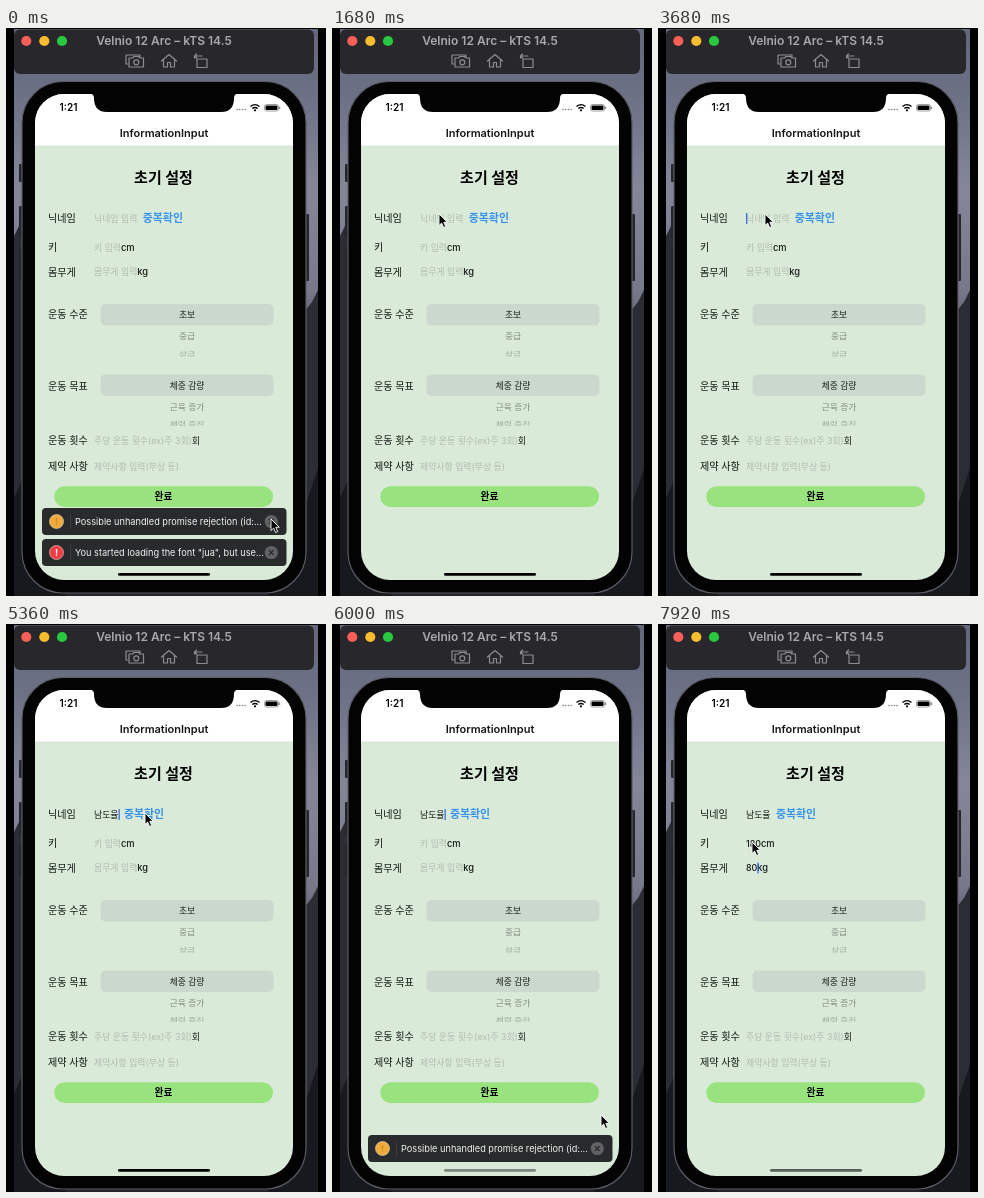
Animation, 320 px wide and 568 px high, one loop 8000 ms. Source, as an HTML page:

```html
<!DOCTYPE html>
<html lang="ko">
<head>
<meta charset="utf-8">
<style>
html, body { margin: 0; width: 100%; height: 100%; overflow: hidden; background: #000; }
svg { display: block; width: 320px; height: 568px; font-family: Inter, "Noto Sans CJK KR", sans-serif; }
.label { font-size: 10.1px; font-weight: 500; fill: #101510; }
.field { font-size: 8.9px; font-weight: 500; fill: #151a15; }
.field .hint { font-weight: 400; fill: #b0bcb1; }
.pick { font-size: 8.8px; text-anchor: middle; fill: #1d241f; font-weight: 500; }
.toast text { font-size: 9.2px; fill: #f2f2f2; }
.icon { fill: none; stroke: #8d8d91; stroke-width: 1.2; stroke-linejoin: round; stroke-linecap: round; }
</style>
</head>
<body>
<svg viewBox="0 0 320 568">
  <defs>
    <linearGradient id="sky" x1="0" y1="0" x2="0" y2="1">
      <stop offset="0" stop-color="#62677c"/>
      <stop offset=".12" stop-color="#6d7186"/>
      <stop offset=".28" stop-color="#85869a"/>
      <stop offset=".46" stop-color="#77788a"/>
      <stop offset=".62" stop-color="#44454f"/>
      <stop offset="1" stop-color="#23242b"/>
    </linearGradient>
    <clipPath id="screen"><rect x="29" y="66" width="258" height="486" rx="29"/></clipPath>
    <clipPath id="wheel"><rect x="95" y="270" width="172" height="58.500"/><rect x="95" y="340" width="172" height="58"/></clipPath>
  </defs>

  <rect width="320" height="568"/>
  <rect x="8" y="1" width="304" height="567" fill="url(#sky)"/>
  <path d="M8 208L13 198 20 216V568H8ZM312 262L306 274 298 284V568H312Z" fill="#2b2c34"/>
  <path d="M8 470L16 452 30 500 60 568H8ZM312 440L302 470 280 530 262 568H312Z" fill="#18191f"/>

  <rect x="8" y="1.500" width="300" height="44.500" rx="6" fill="#28282c"/>
  <circle cx="20.300" cy="13" r="5.100" fill="#f95f57"/>
  <circle cx="38.300" cy="13" r="5.100" fill="#f8bd2f"/>
  <circle cx="56" cy="13" r="5.100" fill="#2ac840"/>
  <text x="158" y="17" font-size="12" font-weight="600" fill="#a9a9ac" text-anchor="middle">Velnio 12 Arc – kTS 14.5</text>
  <g class="icon">
    <path d="M122 36H120V27H134V29"/>
    <path d="M123 30H126.500L128 28.500H132.500L134 30H137.500V39H123Z"/>
    <circle cx="130.300" cy="34.300" r="2.500"/>
    <path d="M155.500 33L163 26.500 170.500 33M157.500 32V39H161.500V34.500H164.500V39H168.500V32"/>
    <path d="M191 31H201V39.500H191ZM188.500 30V28H196M190.500 26L188.500 28 190.500 30"/>
  </g>

  <g fill="#25262b">
    <rect x="13" y="136" width="4" height="18" rx="1"/>
    <rect x="13" y="178" width="4" height="32" rx="1"/>
    <rect x="13" y="221" width="4" height="32" rx="1"/>
    <rect x="299" y="186" width="4" height="67" rx="1"/>
  </g>
  <rect x="16" y="53.500" width="284" height="511.500" rx="41" fill="#030303" stroke="#5b5c64" stroke-width="1.200"/>

  <g clip-path="url(#screen)">
    <rect x="29" y="66" width="258" height="486" fill="#d9ead9"/>
    <rect x="29" y="66" width="258" height="52" fill="#fff"/>
    <rect x="29" y="117.700" width="258" height=".6" fill="#cdd5cd"/>
    <text x="53.500" y="83" font-size="10" font-weight="600">1:21</text>
    <g fill="#777"><circle cx="231" cy="81.500" r=".8"/><circle cx="233.700" cy="81.500" r=".8"/><circle cx="236.400" cy="81.500" r=".8"/><circle cx="239.100" cy="81.500" r=".8"/></g>
    <path d="M244.500 78.500Q249 74.800 253.500 78.500M246.300 80.500Q249 78.400 251.700 80.500" fill="none" stroke="#000" stroke-width="1.400"/>
    <circle cx="249" cy="82.300" r="1.100"/>
    <rect x="258.500" y="76.500" width="14" height="6.500" rx="2" fill="none" stroke="#777" stroke-width=".7"/>
    <rect x="259.500" y="77.500" width="12" height="4.500" rx="1.200"/>
    <rect x="273.200" y="78.500" width="1" height="2.500" fill="#777"/>
    <text x="158" y="109" font-size="11" font-weight="600" text-anchor="middle" fill="#161616">InformationInput</text>

    <text x="157.500" y="154.500" font-size="15" font-weight="700" text-anchor="middle">초기 설정</text>
    <g id="labels"></g>
    <text class="field" x="88" y="193.500"><tspan id="nick"></tspan><tspan dx="5.500" font-size="10.900" font-weight="700" fill="#3a93ea">중복확인</tspan></text>
    <text class="field" x="88" y="222.500"><tspan id="height"></tspan><tspan font-size="9.300">cm</tspan></text>
    <text class="field" x="88" y="247"><tspan id="weight"></tspan><tspan font-size="9.300">kg</tspan></text>
    <text class="field" x="88" y="416"><tspan class="hint">주당 운동 횟수(ex)주 3회)</tspan><tspan>회</tspan></text>
    <text class="field" x="88" y="441.500"><tspan class="hint">제약사항 입력(부상 등)</tspan></text>
    <rect id="caret" width="1.300" height="11" fill="#3f6fe0"/>

    <rect x="94.500" y="276" width="173" height="21.500" rx="5" fill="#cbd8ce"/>
    <rect x="94.500" y="346.500" width="173" height="21.500" rx="5" fill="#cbd8ce"/>
    <g clip-path="url(#wheel)" id="picks"></g>

    <rect x="48.300" y="458.300" width="218.700" height="20.700" rx="10.300" fill="#99e37f"/>
    <text x="157.500" y="472" font-size="9.700" font-weight="600" text-anchor="middle">완료</text>
    <rect id="home" x="112" y="545" width="92" height="2.800" rx="1.400"/>
    <g id="toasts"></g>

    <rect id="dim" x="29" y="66" width="258" height="486" fill="#000"/>
    <g id="alert">
      <rect x="68.500" y="283" width="178.500" height="60" rx="8" fill="#e2e9e3"/>
      <rect x="68.500" y="317.500" width="178.500" height=".7" fill="#c3cdc5"/>
      <text x="157.500" y="303.500" font-size="10.500" font-weight="700" text-anchor="middle">사용이 가능한 닉네임입니다</text>
      <text x="157.500" y="334" font-size="10.500" font-weight="600" text-anchor="middle" fill="#2f86e8">OK</text>
    </g>
  </g>
  <path d="M84 65.500Q88 66 88 70Q88 84 101 84H215Q228 84 228 70Q228 66 232 65.500Z" fill="#030303"/>

  <path id="cursor" d="M0 0V11.500L2.700 9.100 4.600 13.500 6.700 12.600 4.800 8.300H8.300Z" fill="#050505" stroke="#fff" stroke-width=".9" stroke-linejoin="round"/>
</svg>

<script>
const LOOP = 8000, STEP = 80;
const $ = id => document.getElementById(id);

const labels = [["닉네임", 194], ["키", 223], ["몸무게", 247.5], ["운동 수준", 290],
  ["운동 목표", 361.5], ["운동 횟수", 416], ["제약 사항", 442]];
$("labels").innerHTML = labels.map(([s, y]) => `<text class="label" x="42" y="${y}">${s}</text>`).join("");

// Wheel rows get flatter and paler away from the selection.
const row = (s, y, squash, fade) =>
  `<text class="pick" transform="translate(181 ${y}) scale(1 ${squash})" opacity="${fade}">${s}</text>`;
const wheel = (names, y) => row(names[0], y, 1, 1) + row(names[1], y + 21, .88, .48) + row(names[2], y + 37.5, .7, .33);
$("picks").innerHTML = wheel(["초보", "중급", "상급"], 290) + wheel(["체중 감량", "근육 증가", "체력 증진"], 360.5);

const WARN = ["#f0aa3c", "#d58a24", "Possible unhandled promise rejection (id:..."];
const FAIL = ["#ee3d45", "#ffffff", "You started loading the font \"jua\", but use..."];
const toast = ([color, mark, msg], y) => `<g class="toast" transform="translate(0 ${y})">
  <rect x="36" width="244.500" height="27" rx="4" fill="#292a2b"/>
  <circle cx="50.500" cy="13.500" r="7" fill="${color}" stroke="#e9dccb" stroke-width=".6"/>
  <text x="50.500" y="16.800" text-anchor="middle" font-weight="700" style="fill:${mark}">!</text>
  <rect x="64" y="6" width=".6" height="15" fill="#4c4d4e"/>
  <text x="69" y="16.500">${msg}</text>
  <circle cx="265.300" cy="13.500" r="6.600" fill="#616263"/>
  <path d="M263 11.200L267.600 15.800M267.600 11.200L263 15.800" stroke="#222" stroke-width="1.200"/></g>`;
const LOW = 511, HIGH = 480;
const toastSteps = [
  [0, toast(WARN, HIGH) + toast(FAIL, LOW)],
  [320, toast(FAIL, LOW)],
  [800, ""],
  [5520, toast(WARN, LOW)],
  [6320, ""]
];

// time, nickname, height, weight, focused field
const inputs = [[0, "", "", "", ""], [2240, "", "", "", "nick"]];
["ㄴ", "나", "남", "남ㄷ", "남도", "남동", "남도유", "남도율"].forEach((s, i) =>
  inputs.push([4080 + i * 120, s, "", "", "nick"]));
const NAME = "남도율";
inputs.push([5520, NAME, "", "", ""], [5920, NAME, "", "", "nick"], [6880, NAME, "", "", "height"],
  [7040, NAME, "1", "", "height"], [7200, NAME, "18", "", "height"], [7360, NAME, "180", "", "height"],
  [7520, NAME, "180", "", "weight"], [7680, NAME, "180", "8", "weight"], [7840, NAME, "180", "80", "weight"]);
const hints = { nick: "닉네임 입력", height: "키 입력", weight: "몸무게 입력" };
const caretY = { nick: 185, height: 214, weight: 238.5 };

const path = [[0, 265, 491], [320, 265, 491], [560, 263, 518], [800, 263, 518], [1520, 107, 186],
  [4960, 107, 186], [5280, 139, 189], [5440, 139, 189], [5640, 154, 328], [5760, 154, 328],
  [6000, 269, 491], [6160, 264, 519], [6320, 264, 519], [6800, 94, 218], [8000, 94, 218]];

const clamp = v => Math.max(0, Math.min(1, v));
const ramp = (t, a, b) => { const k = clamp((t - a) / (b - a)); return k * k * (3 - 2 * k); };
const current = (steps, t) => steps.filter(s => s[0] <= t).pop();

let shown = null;
function drawToasts(t) {
  const html = current(toastSteps, t)[1];
  if (html !== shown) $("toasts").innerHTML = shown = html;
}

function drawInputs(t) {
  const [since, nick, height, weight, focus] = current(inputs, t);
  const values = { nick, height, weight };
  for (const id in values) {
    $(id).textContent = values[id] || hints[id];
    $(id).setAttribute("class", values[id] ? "" : "hint");
  }
  const on = focus && (t - since) % 1000 < 500;
  $("caret").setAttribute("opacity", on ? 1 : 0);
  if (!on) return;
  const width = values[focus] ? $(focus).getComputedTextLength() : 0;
  $("caret").setAttribute("x", 88 + width);
  $("caret").setAttribute("y", caretY[focus]);
}

function drawAlert(t) {
  const enter = ramp(t, 5440, 5640), seen = enter * (1 - ramp(t, 5760, 5960));
  const size = 1.15 - .15 * enter;
  $("dim").setAttribute("opacity", .23 * seen);
  $("alert").setAttribute("opacity", seen);
  $("alert").setAttribute("transform", `translate(157.5 313) scale(${size}) translate(-157.5 -313)`);
}

function drawCursor(t) {
  const i = path.findIndex(p => p[0] > t);
  const [t0, x0, y0] = path[i - 1], [t1, x1, y1] = path[i];
  const k = ramp(t, t0, t1);
  $("cursor").setAttribute("transform", `translate(${x0 + (x1 - x0) * k} ${y0 + (y1 - y0) * k})`);
}

function draw(t) {
  drawToasts(t);
  drawInputs(t);
  drawAlert(t);
  drawCursor(t);
  $("home").setAttribute("fill", t < 5520 ? "#000" : t < 6320 ? "#7d867e" : "#59605a");
}

const start = performance.now();
function tick() {
  const t = (performance.now() - start) % LOOP;
  draw(Math.floor(t / STEP) * STEP);
  requestAnimationFrame(tick);
}
tick();
</script>
</body>
</html>
```
